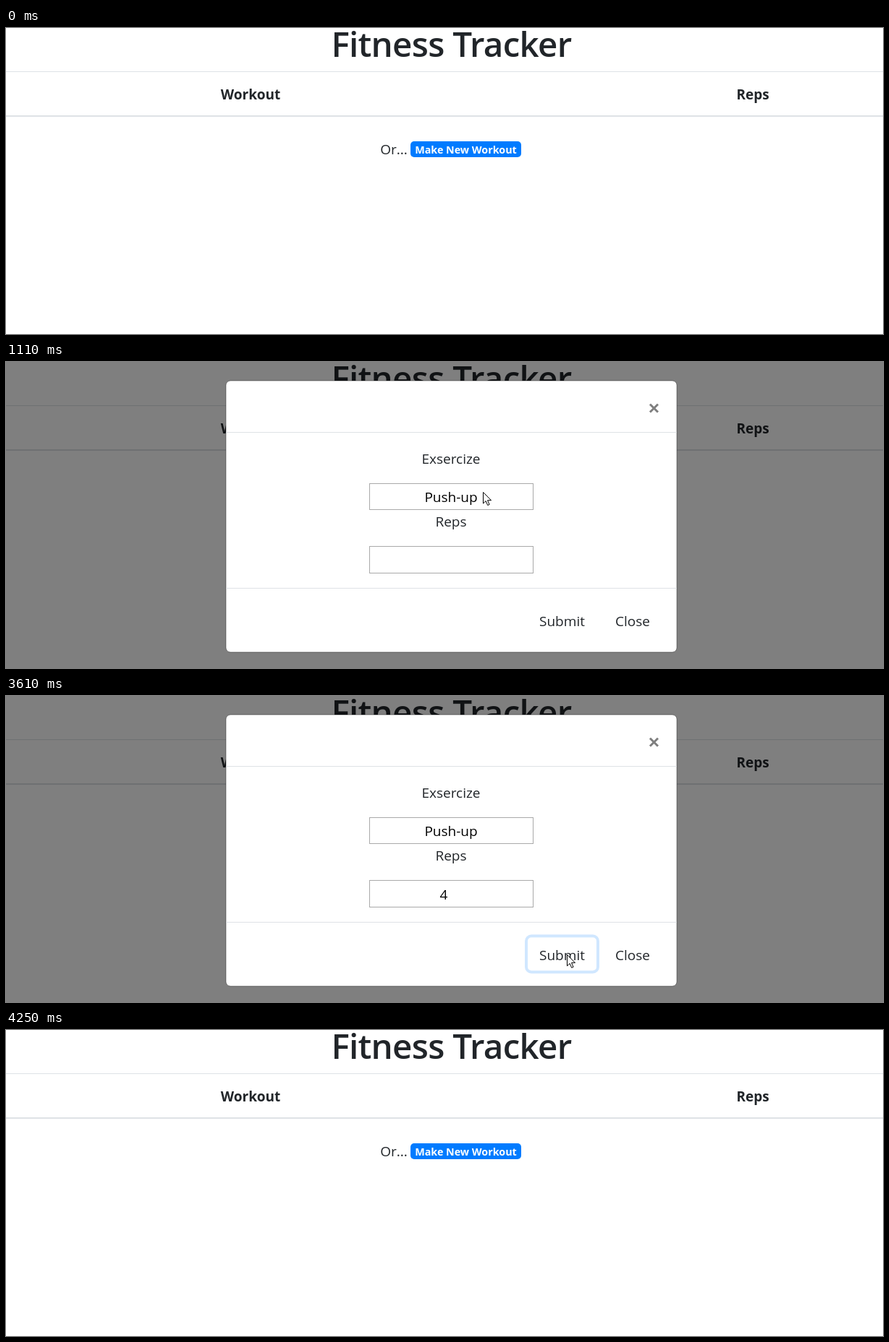
An HTML page for the animation above (4350 ms loop, 1212x424 px).

```html
<!DOCTYPE html>
<html lang="en">
<head>
<meta charset="utf-8">
<title>Fitness Tracker</title>
<style>
  html, body { margin: 0; width: 100%; height: 100%; overflow: hidden; background: #fff; }
  svg { display: block; width: 100vw; height: 100vh; }
  text { font: 19px "Open Sans", "Noto Sans", sans-serif; fill: #212529; text-anchor: middle; }
  .title { font-size: 47.5px; font-weight: 600; letter-spacing: -.7px; }
  .head { font-weight: 700; }
  .badge { font-size: 14.3px; font-weight: 700; fill: #fff; }
  .ring { fill: none; stroke: #007bff; stroke-opacity: .25; stroke-width: 4; }
  .field { fill: #fff; stroke: #a9a9a9; }
  .value { fill: #000; }
  .line { fill: #dee2e6; }
</style>
</head>
<body>
<svg viewBox="0 0 1212 424">
  <text class="title" x="615.5" y="40">Fitness Tracker</text>
  <rect class="line" y="60" width="1212" height="1"/>
  <text class="head" x="338" y="99">Workout</text>
  <text class="head" x="1032" y="99">Reps</text>
  <rect class="line" y="121" width="1212" height="2"/>
  <rect class="ring" id="openRing" x="500.5" y="141.5" width="229" height="51" rx="7"/>
  <text x="536" y="175">Or...</text>
  <rect x="559" y="157" width="153" height="22" rx="5" fill="#007bff"/>
  <text class="badge" x="635.5" y="174">Make New Workout</text>

  <rect id="backdrop" width="1212" height="424"/>

  <g id="modal">
    <rect x="304" y="26" width="623" height="376" rx="6" fill="#fff"/>
    <rect x="304" y="26" width="623" height="376" rx="6" fill="none" stroke="#000" stroke-opacity=".35"/>
    <path d="M890 58.5l11 11m0-11l-11 11" stroke="#7f7f7f" stroke-width="3"/>
    <rect class="line" x="304" y="97" width="623" height="1"/>
    <text x="615" y="141">Exsercize</text>
    <rect class="field" x="502.5" y="168.5" width="226" height="36"/>
    <text class="value" x="615" y="194">Push-up</text>
    <text x="615" y="228">Reps</text>
    <rect class="field" x="502.5" y="255.5" width="226" height="37"/>
    <rect id="focus" x="502" y="255" width="227" height="38" rx="1" fill="none" stroke="#6495dd" stroke-width="2"/>
    <g id="spinner">
      <rect x="707" y="259" width="19" height="30" fill="#f0f0f0"/>
      <path d="M711.5 270.5l5-5.5 5 5.5zM711.5 278l5 5.5 5-5.5z" fill="#505050"/>
    </g>
    <text class="value" id="count" x="605" y="282">4</text>
    <rect id="caret" y="260" width="1" height="27"/>
    <rect class="line" x="304" y="313" width="623" height="1"/>
    <rect class="ring" id="submitRing" x="719" y="332.5" width="99" height="50" rx="7"/>
    <text x="768.5" y="366">Submit</text>
    <text x="866" y="366">Close</text>
  </g>

  <g id="cursor">
    <path id="arrow" d="M.5 .5v15.5l3.6-3.4 2.6 5.9 2.4-1-2.6-5.8h5z" fill="#fff" stroke="#000"/>
    <path id="beam" d="M-3-7.5h2.5l.5.5.5-.5H3M0-7V7M-3 7.5h2.5l.5-.5.5.5H3" fill="none" stroke="#000" stroke-width="1.3"/>
  </g>
</svg>
<script>
const LOOP = 4350;
const parts = Object.fromEntries([...document.querySelectorAll('[id]')].map(el => [el.id, el]));

// Pointer path: time, x, y
const pointerPath = [
  [30, 700, 424], [230, 660, 230], [400, 643, 171], [930, 643, 171],
  [1110, 659, 180], [1290, 654, 188], [1430, 654, 188],
  [1600, 662, 245], [1750, 665, 277], [2740, 665, 277],
  [2830, 720, 240], [2920, 790, 223], [3000, 820, 243], [3100, 824, 270],
  [3230, 812, 298], [3400, 775, 358], [3640, 775, 358],
  [3740, 956, 396], [3790, 965, 396], [3970, 1088, 424]
];

const progress = (t, start, length) => Math.min(1, Math.max(0, (t - start) / length));
const easeOut = p => 1 - (1 - p) ** 1.7;
const pulse = (t, on, off, length = 150) => progress(t, on, length) - progress(t, off, length);
const within = (t, start, end) => t >= start && t < end;
const show = (el, visible) => el.setAttribute('visibility', visible ? 'inherit' : 'hidden');
const fade = (el, opacity) => el.setAttribute('opacity', opacity);

function pointerAt(t) {
  const next = pointerPath.findIndex(point => point[0] > t);
  if (next < 1) return null;
  const [t0, x0, y0] = pointerPath[next - 1];
  const [t1, x1, y1] = pointerPath[next];
  const p = (t - t0) / (t1 - t0);
  return [x0 + (x1 - x0) * p, y0 + (y1 - y0) * p];
}

function drawPointer(t) {
  const point = pointerAt(t);
  show(parts.cursor, point);
  if (!point) return false;
  const [x, y] = point.map(Math.round);
  const overField = within(t, 930, 3640) && within(x, 502, 730) && within(y, 255, 294);
  parts.cursor.setAttribute('transform', `translate(${x} ${y})`);
  show(parts.arrow, !overField);
  show(parts.beam, overField);
  return overField;
}

function draw(t) {
  const overField = drawPointer(t);
  const focused = within(t, 1900, 3500);
  const typed = t >= 2720;
  const raised = 1 - easeOut(progress(t, 630, 300)) + easeOut(progress(t, 3640, 300));

  fade(parts.openRing, pulse(t, 400, 930));
  fade(parts.backdrop, .5 * pulse(t, 485, 3810));
  fade(parts.modal, pulse(t, 630, 3640));
  parts.modal.setAttribute('transform', `translate(0 ${-62.5 * raised})`);

  show(parts.focus, focused);
  show(parts.spinner, focused || overField);
  show(parts.count, typed);
  show(parts.caret, within(t, 1930, 2440) || within(t, 2720, 3230));
  parts.caret.setAttribute('x', typed ? 610 : 606);
  fade(parts.submitRing, progress(t, 3500, 150));
}

function tick() {
  draw(performance.now() % LOOP);
  requestAnimationFrame(tick);
}
tick();
</script>
</body>
</html>
```
